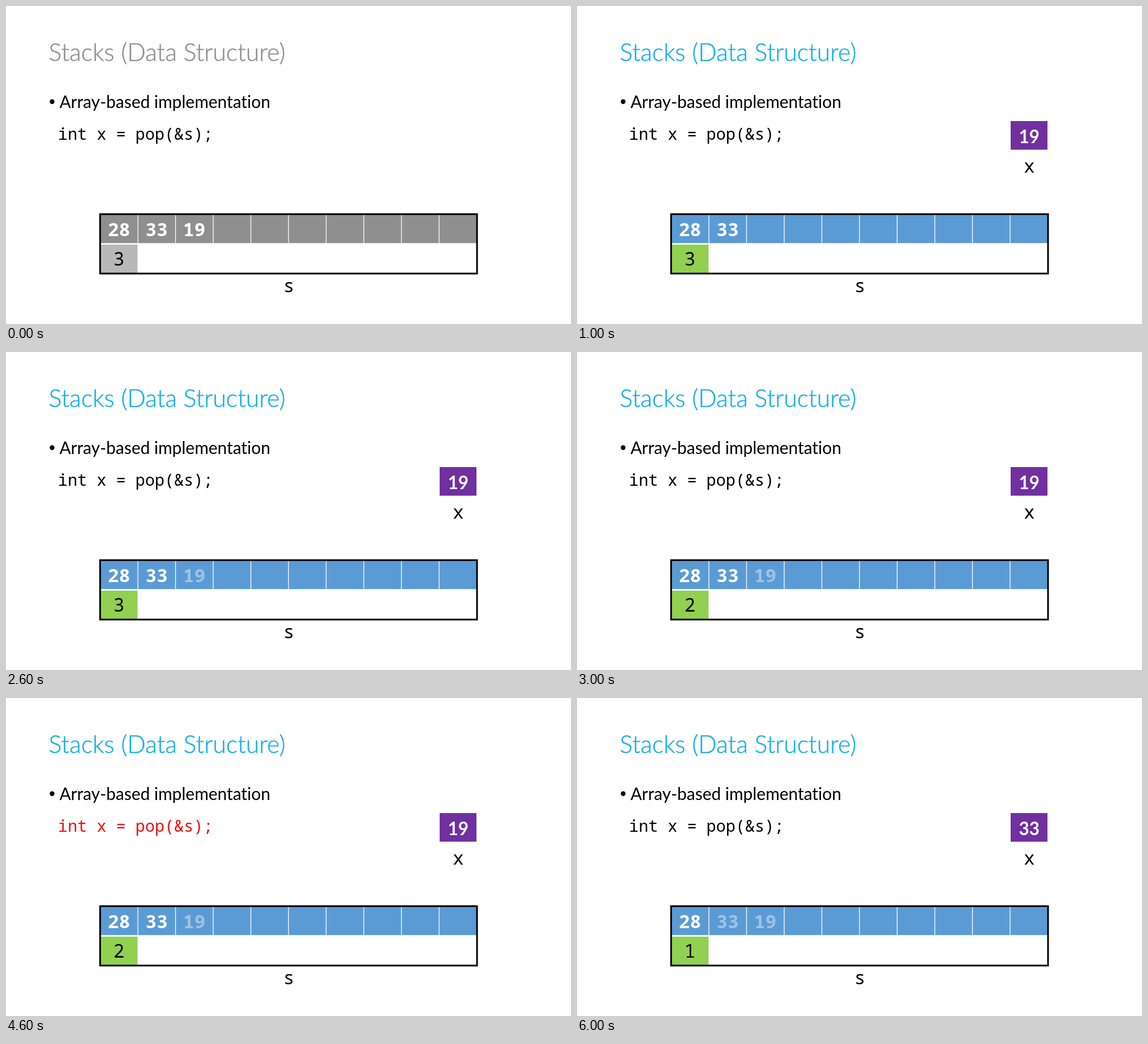
Write an HTML page that moves like this. It is 998 px wide and 561 px high and loops after 7000 ms.

```html
<!DOCTYPE html>
<html lang="en">
<head>
<meta charset="utf-8">
<title>Stack pop</title>
<style>
  html, body { margin: 0; width: 100%; height: 100%; overflow: hidden; background: #fff; }
  svg { display: block; width: 998px; height: 561px; }
  text { font-family: "Noto Sans Mono", monospace; font-size: 33px; white-space: pre; }
  .sans { font-family: Lato, sans-serif; font-variant-ligatures: none; }
  .mid { text-anchor: middle; }
  .bold { font-weight: 700; fill: #fff; }
  .label { font-weight: 500; }
  #title { font-size: 42.8px; font-weight: 300; stroke: currentColor; fill: currentColor; stroke-width: .5px; }
  #bullet { font-size: 29.9px; }
  #code { font-size: 28.5px; }
  #popped { font-size: 31.5px; }
</style>
</head>
<body>
<svg viewBox="0 0 998 561">
  <text id="title" class="sans" x="75.5" y="97">Stacks (Data Structure)</text>
  <circle cx="81.5" cy="168.7" r="4.2"/>
  <text id="bullet" class="sans" x="94.4" y="179.5">Array-based implementation</text>
  <text id="code" x="91.8" y="236">int x = pop(&amp;s);</text>

  <g id="result">
    <rect x="766" y="203" width="65" height="50.5" fill="#7030a0"/>
    <text id="popped" class="sans bold mid" x="798.8" y="241.5"></text>
    <text class="label mid" x="798.8" y="294">x</text>
  </g>

  <rect id="cells" x="167" y="368" width="664" height="50.3"/>
  <path id="dividers" stroke="#fff" stroke-width="1.3"/>
  <g id="values"></g>
  <rect id="top" x="167" y="421" width="65.3" height="50"/>
  <text id="count" class="mid" x="199.5" y="458"></text>
  <rect x="166.2" y="367.2" width="665.8" height="104.8" fill="none" stroke="#000" stroke-width="3"/>
  <text class="label mid" x="499.7" y="505">s</text>
</svg>
<script>
const $ = id => document.getElementById(id);
const PITCH = 66.5, STEP = 1000;
const stack = [28, 33, 19];

// live: values shown in white; ghosts: whether popped values stay visible
const states = [
  { live: 3, count: 3, gray: true },
  { live: 2, count: 3, x: 19 },
  { live: 2, count: 3, x: 19, ghosts: true },
  { live: 2, count: 2, x: 19, ghosts: true },
  { live: 2, count: 2, x: 19, ghosts: true, active: true },
  { live: 1, count: 2, x: 33, ghosts: true },
  { live: 1, count: 1, x: 33, ghosts: true }
];

$("dividers").setAttribute("d",
  Array.from({ length: 9 }, (_, i) => `M${166.5 + PITCH * (i + 1)} 369V418`).join(""));
$("values").innerHTML = stack.map((value, i) =>
  `<text class="bold mid" x="${199.5 + PITCH * i}" y="406">${value}</text>`).join("");

function show({ live, count, x, ghosts, active, gray }) {
  $("title").style.color = gray ? "#8f8f8f" : "#18aee5";
  $("cells").style.fill = gray ? "#8f8f8f" : "#5b9bd5";
  $("top").style.fill = gray ? "#b8b8b8" : "#92d050";
  $("code").style.fill = active ? "#f00e0e" : "#000";
  $("result").style.display = x ? "" : "none";
  $("popped").textContent = x || "";
  $("count").textContent = count;
  [...$("values").children].forEach((text, i) => {
    text.style.fill = i < live ? "#fff" : ghosts ? "#9dc3e6" : "none";
  });
}

const start = performance.now();
function tick() {
  const elapsed = performance.now() - start;
  show(states[Math.floor(elapsed / STEP) % states.length]);
  requestAnimationFrame(tick);
}
tick();
</script>
</body>
</html>
```
